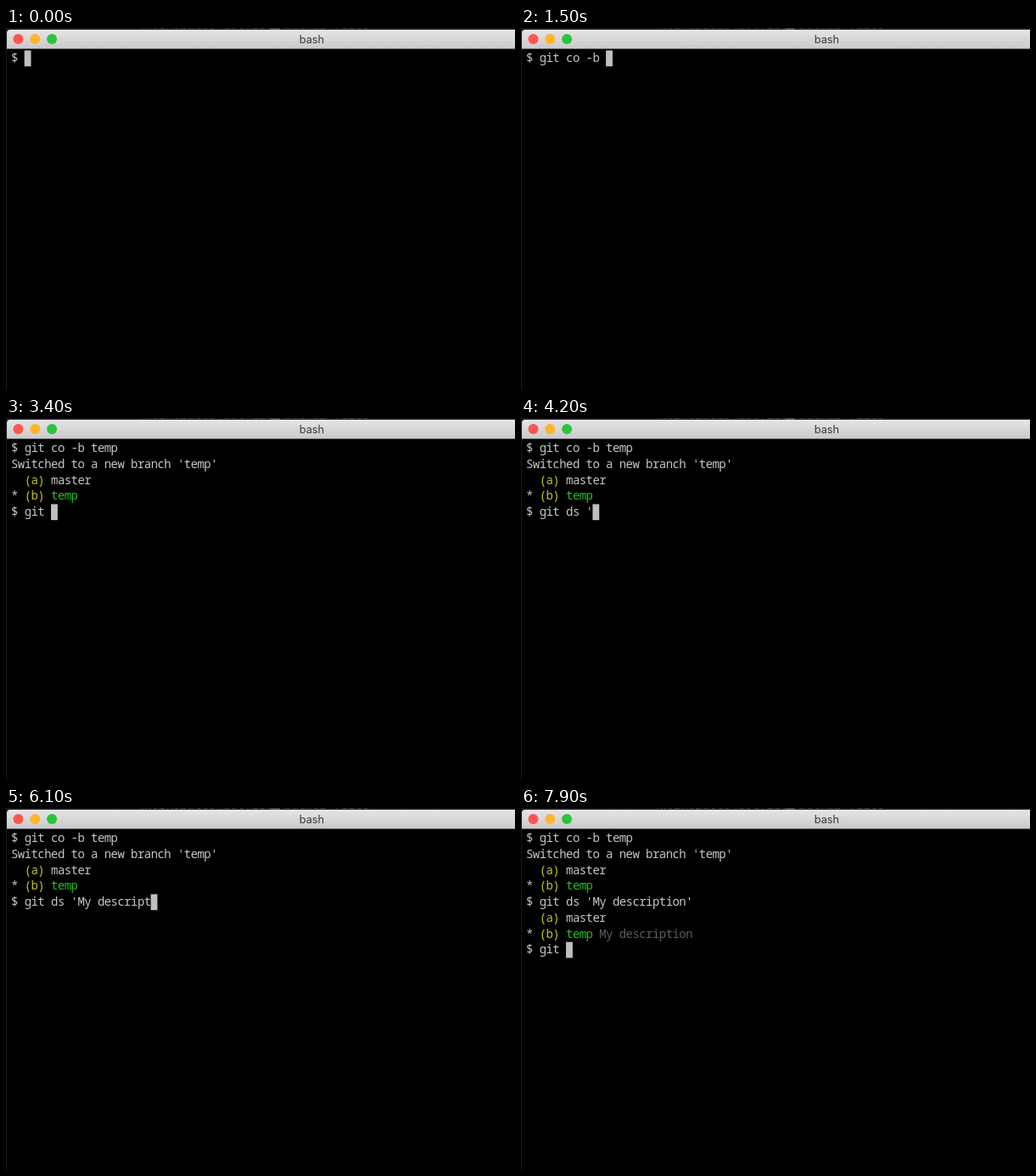
Animation, 600 px wide and 426 px high, one loop 8 s. Source, as an HTML page with a canvas:

```html
<!DOCTYPE html>
<html lang="en">
<head>
<meta charset="utf-8">
<title>bash</title>
<style>
html, body { margin: 0; width: 100%; height: 100%; overflow: hidden; background: #000; }
canvas { display: block; width: 600px; height: 426px; }
</style>
</head>
<body>
<canvas id="stage" width="600" height="426"></canvas>
<script>
const ctx = document.getElementById('stage').getContext('2d');
const LOOP = 8000, TICK = 100, KEY_GAP = 66;
const LEFT = 6, TOP = 26.4, COL = 7.84, ROW = 18.75, BASE = 13.8;
const MONO = '14px "Noto Sans Mono", "DejaVu Sans Mono", monospace';
const WHITE = '#c7c7c7', YELLOW = '#c7c420', GREEN = '#1fc220', DIM = '#5c5c5c';

// Everything on screen is a stream of characters, each with its time.
const stream = [];

function emit(time, text, color = WHITE, gap = 0) {
  [...text].forEach((ch, i) => stream.push({ time: time + i * gap, ch, color }));
}

const type = (time, text) => emit(time, text, WHITE, KEY_GAP);

function listBranches(time, note = '') {
  emit(time, '  ');
  emit(time, '(a)', YELLOW);
  emit(time, ' master\n* ');
  emit(time, '(b)', YELLOW);
  emit(time, ' ');
  emit(time, 'temp', GREEN);
  emit(time, note + '\n', DIM);
}

emit(0, '$ ');
type(700, 'git ');
type(1100, 'co -b ');
type(1700, 'temp');
emit(2300, "\nSwitched to a new branch 'temp'\n");
listBranches(2400);
emit(2500, '$ ');
type(3200, 'git ');
type(3800, 'ds ');
type(4200, "'");
type(4600, 'M');
type(4960, 'y d');
type(5400, 'esc');
type(5760, 'rip');
type(6100, 'tion');
type(6500, "'");
emit(6900, '\n');
listBranches(7000, ' My description');
emit(7000, '$ ');
type(7700, 'git ');

function drawTerminal(t) {
  let row = 0, col = 0;
  ctx.font = MONO;
  ctx.textAlign = 'left';
  for (const { time, ch, color } of stream) {
    if (time > t) break;
    if (ch === '\n') {
      row++;
      col = 0;
      continue;
    }
    ctx.fillStyle = color;
    ctx.fillText(ch, LEFT + col * COL, TOP + row * ROW + BASE);
    col++;
  }
  ctx.fillStyle = '#bfbfbf';
  ctx.fillRect(LEFT + col * COL, TOP + row * ROW, COL, ROW);
}

function drawButton(i, color) {
  ctx.beginPath();
  ctx.arc(14.5 + i * 19.8, 13, 6, 0, Math.PI * 2);
  ctx.fillStyle = color;
  ctx.fill();
}

function drawWindow() {
  ctx.fillStyle = '#000';
  ctx.fillRect(0, 0, 600, 426);
  ctx.fillStyle = '#1c1b1e';
  ctx.fillRect(0, 0, 600, 5);
  ctx.fillRect(0, 5, 1, 421);

  // Text of the window behind, mostly hidden by the title bar.
  ctx.font = MONO;
  ctx.textAlign = 'left';
  ctx.fillStyle = '#4c4c4f';
  ctx.fillText('\\Workspaces\\dotfiles\\', 155, 1);
  ctx.fillText('backup files', 328, 1);
  ctx.fillRect(312, 0, 11, 2);

  const bar = ctx.createLinearGradient(0, 2, 0, 24);
  bar.addColorStop(0, '#e6e4e6');
  bar.addColorStop(1, '#cbc9cb');
  ctx.fillStyle = bar;
  ctx.beginPath();
  ctx.roundRect(1, 2, 610, 22.5, [4, 0, 0, 0]);
  ctx.fill();

  ['#fc5650', '#fdb52c', '#28c63c'].forEach((color, i) => drawButton(i, color));

  ctx.font = '12.8px Inter, "Liberation Sans", sans-serif';
  ctx.textAlign = 'center';
  ctx.fillStyle = '#3b3a3b';
  ctx.fillText('bash', 360.4, 17.6);
}

function draw(t) {
  drawWindow();
  drawTerminal(Math.floor(t / TICK) * TICK);
}

const origin = performance.now();
function frame() {
  draw((performance.now() - origin) % LOOP);
  requestAnimationFrame(frame);
}
frame();
</script>
</body>
</html>
```
